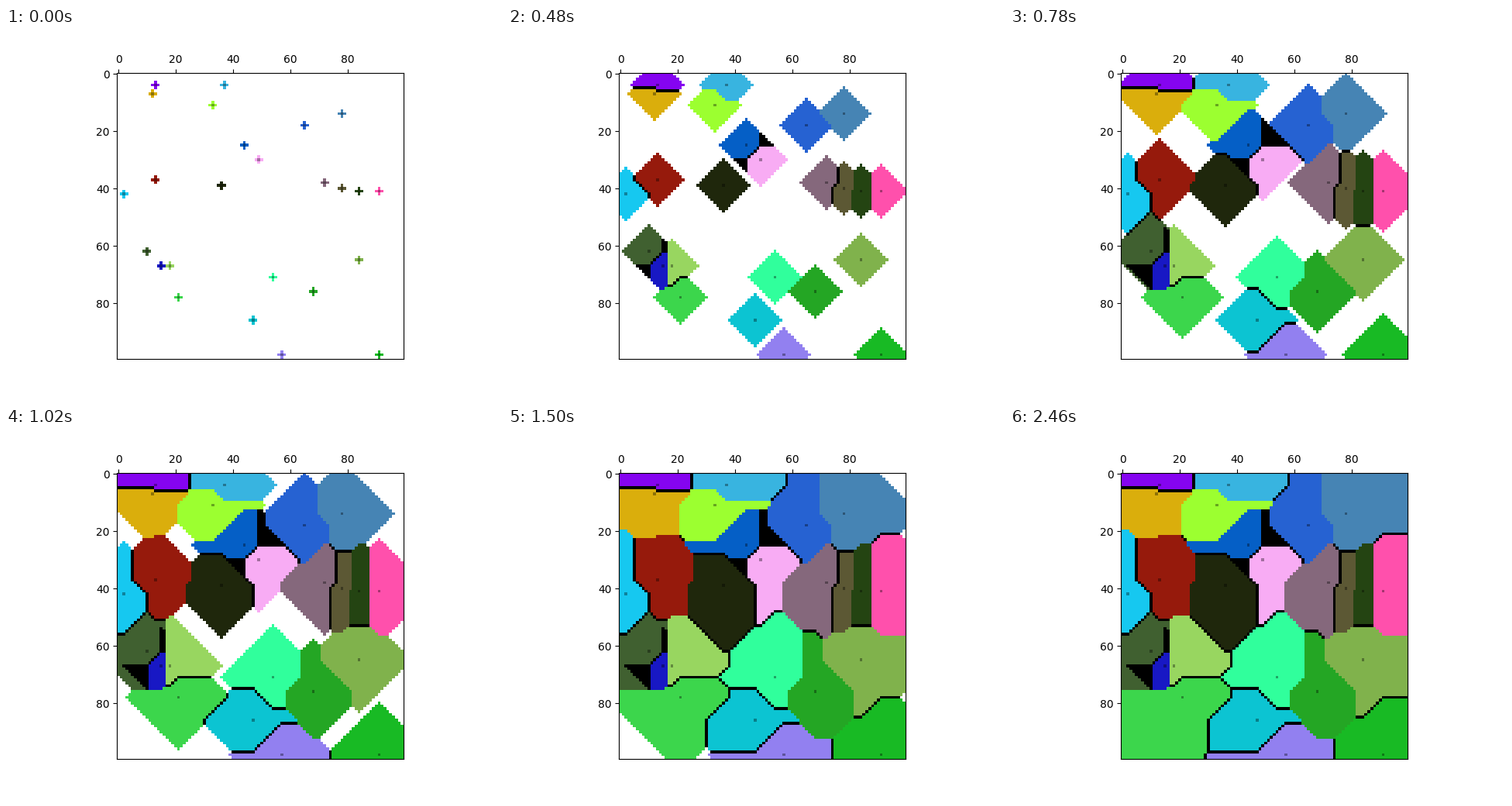
Write a matplotlib script that moves like this. It is 640 px wide and 480 px high and loops after 6 s.

```python
import numpy as np
import matplotlib.pyplot as plt
from matplotlib.animation import FuncAnimation

SIZE = 100
FRAMES = 100
INTERVAL = 60
SHADE = 0.65

# column, row, colour
SEEDS = [
    (13, 4, "#8504f0"), (12, 7, "#daae0c"), (37, 4, "#38b4e0"),
    (33, 11, "#9cff30"), (78, 14, "#4684b4"), (65, 18, "#2662d2"),
    (44, 25, "#055fc6"), (49, 30, "#f8acf4"), (13, 37, "#961a0c"),
    (36, 39, "#1f270c"), (2, 42, "#16c8f0"), (72, 38, "#85687c"),
    (78, 40, "#5c5834"), (84, 41, "#244412"), (91, 41, "#ff50ac"),
    (10, 62, "#406030"), (15, 67, "#1818c4"), (18, 67, "#98d660"),
    (21, 78, "#3cd64c"), (54, 71, "#30ff9c"), (68, 76, "#24a624"),
    (84, 65, "#80b24c"), (47, 86, "#0cc4d2"), (57, 98, "#9280f0"),
    (91, 98, "#18ba24"),
]


def rgb(code):
    return np.array([int(code[k:k + 2], 16) for k in (1, 3, 5)])


def grow():
    """Grow all seeds as Manhattan diamonds; return cell colours and claim times."""
    rows, cols = np.indices((SIZE, SIZE))
    dist = np.array([abs(cols - x) + abs(rows - y) for x, y, _ in SEEDS])
    colors = np.zeros((SIZE, SIZE, 3), dtype=np.uint8)
    born = np.full((SIZE, SIZE), -1)
    for x, y, code in SEEDS:
        colors[y, x] = rgb(code) * SHADE
        born[y, x] = 0

    active = np.ones(len(SEEDS), dtype=bool)
    radius = 0
    while active.any():
        radius += 1
        rings = (dist == radius) & (born < 0) & active[:, None, None]
        hits = rings.sum(axis=0)
        # cells reached by several seeds at once stay black
        born[hits > 0] = radius
        for k, (_, _, code) in enumerate(SEEDS):
            won = rings[k] & (hits == 1)
            colors[won] = rgb(code)
            active[k] = won.any()
    return colors, born


colors, born = grow()


def picture(i):
    return np.where((born <= i + 1)[..., None], colors, 255).astype(np.uint8)


fig, ax = plt.subplots(figsize=(6.4, 4.8), dpi=100)
image = ax.imshow(picture(0), interpolation="nearest")
ax.xaxis.tick_top()


def update(i):
    image.set_data(picture(i))
    return [image]


anim = FuncAnimation(fig, update, frames=FRAMES, interval=INTERVAL,
                     repeat=True, repeat_delay=0)
plt.show()
```
